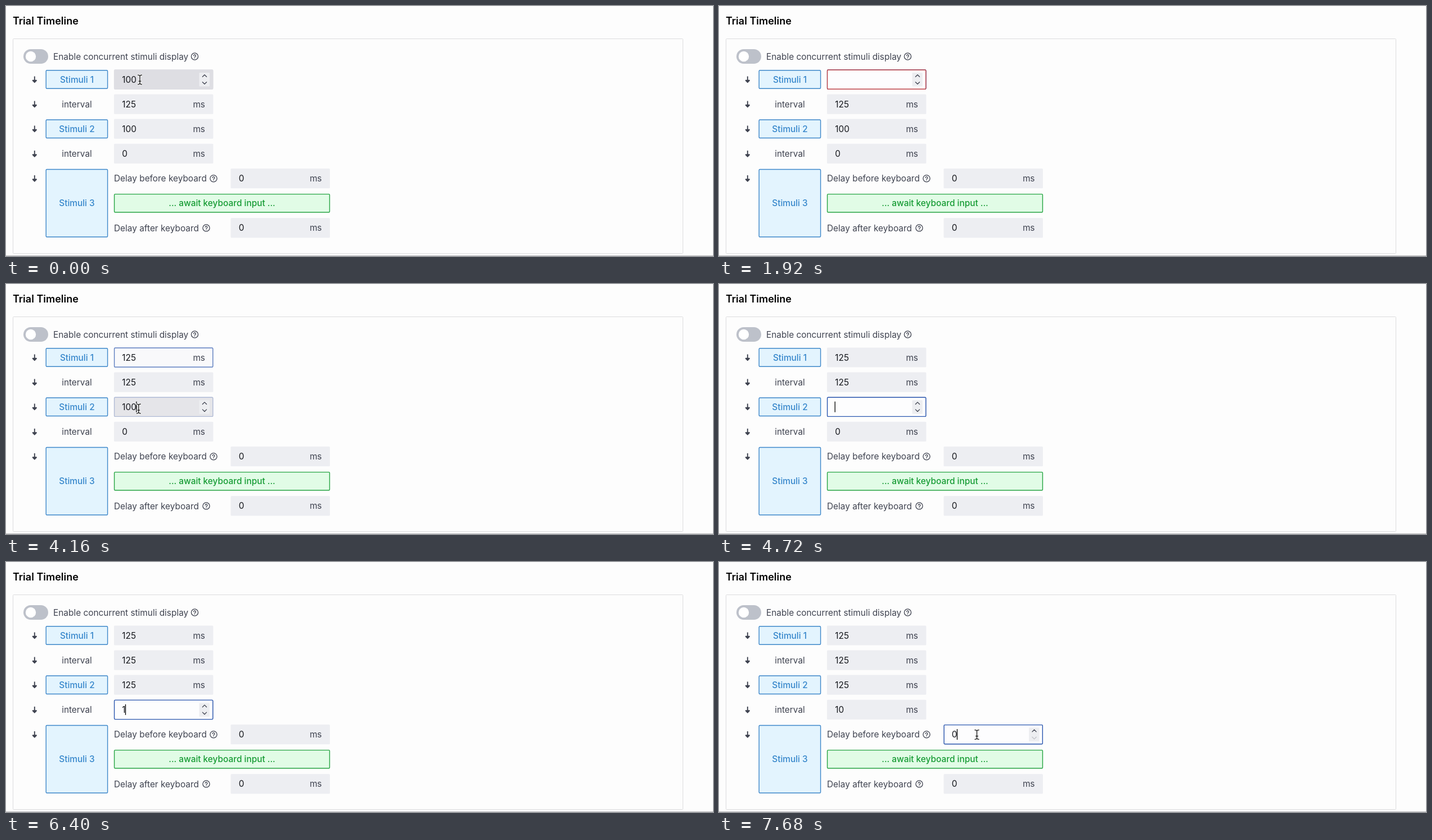
Recreate the animation shown at these times as an HTML page. Size 1257x446 px, loop 8000 ms.

```html
<!DOCTYPE html>
<html lang="en">
<head>
<meta charset="utf-8">
<title>Trial Timeline</title>
<style>
  html, body { margin: 0; height: 100%; overflow: hidden; background: #fdfdfd; }
  svg { display: block; width: 1257px; height: 446px; }
  text { font: 15.4px Inter, "Liberation Sans", sans-serif; fill: #3f4350; white-space: pre; }
  .title { font-size: 18px; font-weight: 600; fill: #000; }
  .strong { font-weight: 500; }
  .value { fill: #16181d; }
  .line { fill: none; stroke: #3f4350; stroke-width: 1.3; stroke-linecap: round; stroke-linejoin: round; }
</style>
</head>
<body>
<svg id="stage" viewBox="0 0 1257 446"></svg>
<script>
const LOOP = 8000, STEP = 80;
const stage = document.getElementById('stage');

function add(tag, attrs, parent = stage, content) {
  const el = document.createElementNS('http://www.w3.org/2000/svg', tag);
  for (const key in attrs) el.setAttribute(key, attrs[key]);
  if (content !== undefined) el.textContent = content;
  parent.append(el);
  return el;
}
const label = (x, y, content, attrs = {}, parent) => add('text', { x, y: y + 5.5, ...attrs }, parent, content);
const box = (x, y, width, height, fill, stroke, parent) =>
  add('rect', { x, y, width, height, rx: 1.5, fill, stroke, 'stroke-width': 1.4 }, parent);

function help(x, y) {
  add('circle', { cx: x, cy: y, r: 6.1, class: 'line' });
  add('path', { d: `M${x - 1.9} ${y - 1.3}a1.9 1.8 0 1 1 2.7 1.7q-.8 .4-.8 1.2M${x} ${y + 3.3}v.1`, class: 'line' });
}
function arrow(y) {
  add('path', { d: `M50.8 ${y - 5.5}V${y + 4.5}M47.6 ${y + 1.8}L50.8 ${y + 5.2}L54 ${y + 1.8}Z`,
    fill: '#3f4350', stroke: '#3f4350', 'stroke-width': 1.9, 'stroke-linejoin': 'round' });
}
function stimulus(n, y, height) {
  box(71.2, y - height / 2, 109.4, height, '#e3f4fe', '#3d87c9');
  label(126, y, 'Stimuli ' + n, { 'text-anchor': 'middle', class: 'strong', style: 'fill:#3586cb' });
}

// Static page
label(12, 27.3, 'Trial Timeline', { class: 'title' });
add('rect', { x: 12.5, y: 58.5, width: 1191, height: 383, rx: 1, fill: 'none', stroke: '#dcdcde' });
add('rect', { x: 0, y: 445, width: 1257, height: 1, fill: '#b4b4b6' });
add('rect', { x: 31, y: 77, width: 44, height: 26, rx: 13, fill: '#bdc1ca' });
add('circle', { cx: 44, cy: 90, r: 9.2, fill: '#fff' });
label(84, 90, 'Enable concurrent stimuli display');
help(335.5, 90);
[131, 175, 219, 263.5, 307.5].forEach(arrow);
stimulus(1, 131, 32.5);
stimulus(2, 219.3, 32.5);
stimulus(3, 351.8, 120.5);
for (const y of [175, 263.5]) label(126, y, 'interval', { 'text-anchor': 'middle' });
label(192, 307.7, 'Delay before keyboard');
help(369, 307.7);
label(192, 396, 'Delay after keyboard');
help(356, 396);
box(192.6, 335.6, 382.8, 32.4, '#e1fce6', '#27a443');
label(384, 351.8, '... await keyboard input ...', { 'text-anchor': 'middle', class: 'strong', style: 'fill:#159b33' });

// Number fields: edits are [time, value], the rest are [start, end] spans
const fields = [
  { x: 192, y: 131, edits: [[0, '100'], [640, '10'], [800, '1'], [1040, ''], [2080, '1'], [2560, '12'], [3040, '125']],
    hover: [[-999, 3180]], focus: [[80, 4110]], error: [[1040, 2080]] },
  { x: 192, y: 175.1, edits: [[0, '125']], hover: [[3200, 3250]] },
  { x: 192, y: 219.2, edits: [[0, '100'], [4480, '10'], [4640, '1'], [4720, ''], [4800, '1'], [4880, '12'], [4960, '125']],
    hover: [[3260, 3310], [3900, 5130]], focus: [[4110, 5520]], error: [[4720, 4800]] },
  { x: 192, y: 263.4, edits: [[0, '0'], [6000, ''], [6320, '1'], [6560, '10']],
    hover: [[3320, 3460], [3600, 3780], [5130, 6960]], focus: [[5520, 7400]], error: [[6000, 6200]] },
  { x: 399.5, y: 307.6, edits: [[0, '0']], hover: [[7140, 9999]], focus: [[7400, 9999]] },
  { x: 399.5, y: 395.9, edits: [[0, '0']] }
];

for (const f of fields) {
  const g = add('g', { transform: `translate(${f.x} ${f.y})` });
  const layer = (fill, stroke) => box(.6, -17, 175.2, 34.2, fill, stroke, g);
  add('rect', { x: 0, y: -17.6, width: 176.4, height: 35.2, rx: 1.5, fill: '#edeef2' }, g);
  f.hoverBox = layer('#dedee3', '#dedee3');
  f.focusBox = layer('#fdfdfe', '#2c58b0');
  f.errorBox = layer('#fdfdfe', '#bd4146');
  f.text = label(14.3, 0, '', { class: 'value' }, g);
  f.unit = label(162, 0, 'ms', { 'text-anchor': 'end' }, g);
  f.spin = add('g', {}, g);
  add('rect', { x: 151.5, y: -12, width: 18.5, height: 24.5, rx: 1, fill: '#edeef1' }, f.spin);
  add('path', { d: 'M157.4 -4.7l3.6-3.6l3.6 3.6', class: 'line' }, f.spin);
  f.down = add('path', { d: 'M157.4 4.7l3.6 3.6l3.6-3.6', class: 'line' }, f.spin);
  f.caret = add('rect', { y: -9.5, width: 1.3, height: 19, fill: '#000' }, g);
}

const beam = 'M-3.6 -8.3Q0 -8.3 0 -6Q0 -8.3 3.6 -8.3M0 -6V6M-3.6 8.3Q0 8.3 0 6Q0 8.3 3.6 8.3M-2 2.6H2';
const pointer = add('g', { fill: 'none', 'stroke-linecap': 'round' });
add('path', { d: beam, stroke: '#fff', 'stroke-width': 3 }, pointer);
add('path', { d: beam, stroke: '#111', 'stroke-width': 1.3 }, pointer);

const path = [[0, 238, 131.5], [3120, 238, 131.5], [3360, 246, 264], [3520, 248, 282.5], [3680, 246, 274],
  [4000, 235.8, 222.5], [5040, 235.8, 222.5], [5280, 252.8, 275.5], [5440, 254, 268], [6800, 254, 268],
  [7320, 458.5, 308], [LOOP, 458.5, 308]];
const shown = [[0, 640], [3120, 4480], [5040, 6000], [6800, LOOP]];

const clamp = v => Math.max(0, Math.min(1, v));
const within = (spans, t) => (spans || []).find(([a, b]) => t >= a && t < b);
const level = (spans, t, fade) => Math.max(0, ...(spans || []).map(([a, b]) =>
  clamp(clamp((Math.min(t, b) - a) / fade) - Math.max(0, t - b) / fade)));

function drawField(f, t) {
  const [edited, value] = f.edits.findLast(e => e[0] <= t);
  const hover = level(f.hover, t, 120);
  const focused = within(f.focus, t);
  f.text.textContent = value;
  f.hoverBox.style.opacity = f.unitHidden = hover;
  f.focusBox.style.opacity = level(f.focus, t, 200);
  f.errorBox.style.opacity = level(f.error, t, 200);
  f.unit.style.opacity = 1 - hover;
  f.spin.style.opacity = hover;
  f.down.style.opacity = value === '0' ? .25 : 1;
  const since = focused ? t - Math.max(edited, focused[0]) : 0;
  f.caret.style.display = focused && since % 1000 < 500 ? '' : 'none';
  f.caret.setAttribute('x', 13.6 + (value ? f.text.getComputedTextLength() : 0));
}

function drawPointer(t) {
  const i = path.findLastIndex(p => p[0] <= t);
  const [t0, x0, y0] = path[i], [t1, x1, y1] = path[i + 1];
  const k = (t - t0) / (t1 - t0), e = k * k * (3 - 2 * k);
  pointer.setAttribute('transform', `translate(${x0 + (x1 - x0) * e} ${y0 + (y1 - y0) * e})`);
  pointer.style.display = within(shown, t) ? '' : 'none';
}

function frame() {
  const now = performance.now() % LOOP, t = now - now % STEP;
  fields.forEach(f => drawField(f, t));
  drawPointer(t);
  requestAnimationFrame(frame);
}
frame();
</script>
</body>
</html>
```
